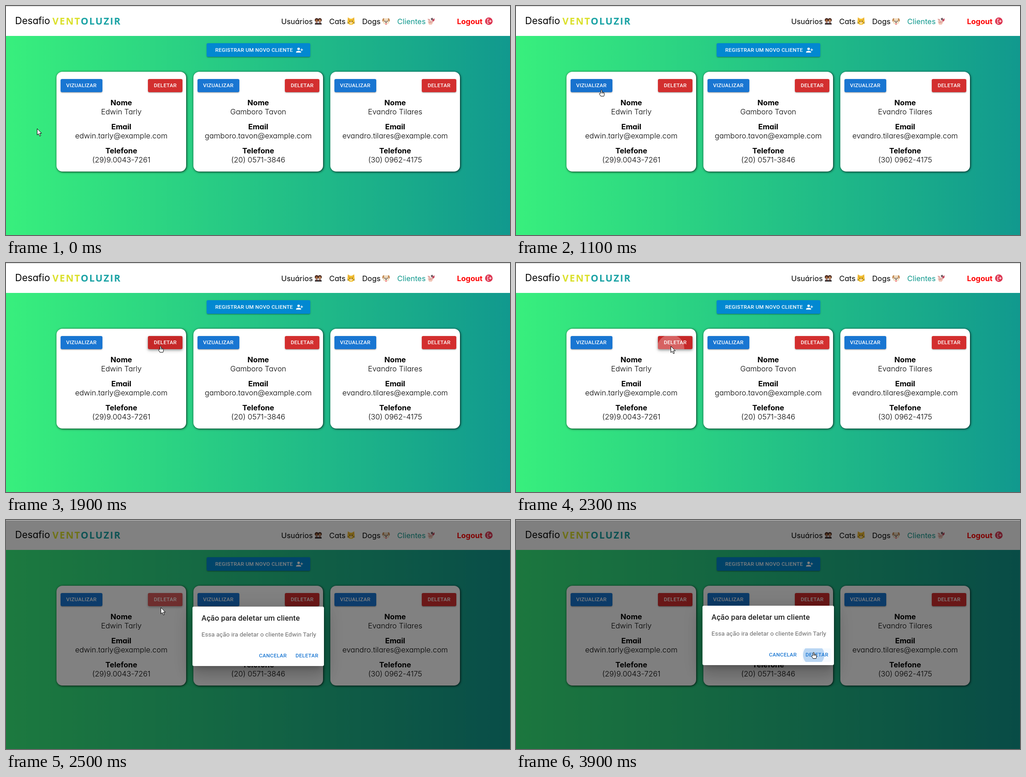
These frames come from a looping animation (1108 px wide and 505 px high, 4000 ms). An HTML page:

```html
<!DOCTYPE html>
<html lang="pt-BR">
<head>
<meta charset="utf-8">
<title>Clientes</title>
<style>
html, body { margin: 0; width: 100%; height: 100%; overflow: hidden; }
#stage { position: relative; width: 1108px; height: 505px; overflow: hidden;
  background: linear-gradient(to left, #11998e, #38ef7d);
  font: 16.4px/20px Inter, "Noto Sans", sans-serif; font-feature-settings: "cv11"; color: #000; }
#stage div { position: absolute; white-space: nowrap; }
#stage svg { position: absolute; overflow: visible; }
.header { background: #fff; }
.edge { background: #c9c9c9; }
.title { font-size: 21px; }
.brand { font: 700 21px/24px "Open Sans", sans-serif; letter-spacing: 2px; color: #1ba3a5; }
.brand span { color: #dbe02c; }
.active { color: #11998e; }
.logout { color: #f00; font-weight: 700; }
.card { background: #fff; border-radius: 13px; box-shadow: 1px 1px 5px rgba(0,0,0,.85); }
.line { text-align: center; font-weight: 300; }
.bold { font-weight: 700; }
.btn { font: 500 11.5px/28px Roboto, sans-serif; letter-spacing: .31px; text-align: center; color: #fff;
  border-radius: 3.3px; overflow: hidden;
  box-shadow: 0 2.5px 1px -1.7px rgba(0,0,0,.2), 0 1.7px 1.7px rgba(0,0,0,.14), 0 1px 4px rgba(0,0,0,.12); }
.info { background: #0288d1; text-align: left; line-height: 30px; }
.view { background: #1976d2; }
.del { background: #d32f2f; }
.text { background: none; color: #1976d2; box-shadow: none; }
.ripple { border-radius: 50%; }
.dim { background: #000; }
.dialog { background: #fff; border-radius: 3.3px; font-family: Roboto, sans-serif;
  box-shadow: 0 9px 12px -6px rgba(0,0,0,.2), 0 20px 32px 2px rgba(0,0,0,.14), 0 8px 38px 7px rgba(0,0,0,.12); }
.heading { font-size: 16.6px; font-weight: 500; letter-spacing: .12px; color: rgba(0,0,0,.87); }
.body { font-size: 13.3px; letter-spacing: .125px; color: rgba(0,0,0,.6); }
</style>
</head>
<body>
<div id="stage"></div>
<script>
const stage = document.getElementById('stage');

function box(parent, cls, x, y, w, h, html = '') {
  const el = document.createElement('div');
  el.className = cls;
  el.style.cssText = `left:${x}px;top:${y}px;width:${w}px;height:${h}px`;
  el.innerHTML = html;
  parent.append(el);
  return el;
}

function icon(parent, x, y, size, view, shapes) {
  parent.insertAdjacentHTML('beforeend',
    `<svg style="left:${x}px;top:${y}px" width="${size}" height="${size}" viewBox="0 0 ${view} ${view}">${shapes}</svg>`);
  return parent.lastElementChild;
}

const dot = (x, y, r, fill) => `<circle cx="${x}" cy="${y}" r="${r}" fill="${fill}"/>`;
const shape = (d, fill, extra = '') => `<path d="${d}" fill="${fill}" ${extra}/>`;
const eyes = dot(6, 8.5, 1.1, '#322') + dot(11, 8.5, 1.1, '#322');
const person = (x, skin) => dot(x, 6, 4.3, '#46271f') + dot(x, 7, 2.6, skin) +
  shape(`M${x - 4} 16q0-5 4-5t4 5z`, '#3b3a3c') + shape(`M${x - 1.2} 11h2.4l-1.2 4z`, '#b3473c');

const icons = {
  people: person(5, '#a5683f') + person(12, '#c98c5c'),
  cat: shape('M1.5 0l5 3h4l5-3 .8 10q-1 6-7.8 6.5Q1.7 16 .7 10z', '#f3c12f') +
    shape('M2.7 2.5l2 2-2 2zM14.3 2.5l-2 2 2 2z', '#d88a58') + eyes +
    dot(8.5, 12, 2.6, '#fbe9b0') + shape('M7.3 10.5h2.4l-1.2 1.5z', '#b55') +
    shape('M0 11l4 .5M0 13.5l4-.8M17 11l-4 .5M17 13.5l-4-.8', 'none', 'stroke="#6b5320" stroke-width=".7"'),
  dog: dot(8.5, 9, 7, '#f0dcc0') + shape('M4.5 2Q0 1 .3 8q1.7 3 3.7-1zM12.5 2q4.500-1 4.2 6-1.7 3-3.7-1z', '#c28a55') +
    eyes + dot(8.5, 12, 3, '#fff6e6') + dot(8.5, 10.8, 1.4, '#3a2b2b') + shape('M7 13h3q0 3.5-1.5 3.5T7 13z', '#ef6d78'),
  client: shape('M1 9l5-2 5 1 2 3-3 5H4z', '#f0c2b4') + shape('M1 3l5 1 1 4-5-1z', '#e2a9a4') +
    shape('M8 2l4-1 1 4-4 2z', '#6c5960') + shape('M11 6l5-4v5l-4 3z', '#c4485c') + shape('M4 11l6-1', 'none', 'stroke="#b2737b"'),
  exit: dot(8.5, 8.5, 8.3, '#dc3450') +
    shape('M9 4H5.5v9H9M8 8.5h5M11 6l2.5 2.5L11 11', 'none', 'stroke="#fbdde0" stroke-width="1.5"')
};

// Header
box(stage, 'header', 0, 0, 1108, 66);
box(stage, 'title', 20, 22.5, 80, 20, 'Desafio');
box(stage, 'brand', 102, 21, 160, 24, '<span>VENT</span>OLUZIR');
[['', 605, 'Usuários', 677.5, 'people'], ['', 710.5, 'Cats', 750, 'cat'], ['', 783, 'Dogs', 827, 'dog'],
 ['active', 860, 'Clientes', 925.5, 'client'], ['logout', 991.5, 'Logout', 1053, 'exit']]
  .forEach(([cls, x, label, ix, name]) => {
    box(stage, cls, x, 24, 70, 20, label);
    icon(stage, ix, 25, 17, 17, icons[name]);
  });

// New client button
const register = box(stage, 'btn info', 441, 82, 227.5, 30.3);
box(register, '', 19, 0, 175, 30, 'REGISTRAR UM NOVO CLIENTE');
icon(register, 195.5, 6.7, 16.6, 24,
  shape('M13 8a4 4 0 1 0-8 0 4 4 0 0 0 8 0zm2 2v2h3v3h2v-3h3v-2h-3V7h-2v3zM1 18v2h16v-2c0-2.66-5.33-4-8-4s-8 1.34-8 4z', '#fff'));

// Cards
const clients = [
  ['Edwin Tarly', 'edwin.tarly@example.com', '(29)9.0043-7261'],
  ['Gamboro Tavon', 'gamboro.tavon@example.com', '(20) 0571-3846'],
  ['Evandro Tilares', 'evandro.tilares@example.com', '(30) 0962-4175']
];
const cards = clients.map((values, i) => {
  const card = box(stage, 'card', 111 + 301 * i, 144.5, 285.3, 220.5);
  const view = box(card, 'btn view', 8.5, 16, 92.5, 29.8, 'VIZUALIZAR');
  const del = box(card, 'btn del', 201.3, 16, 75.5, 29.8, 'DELETAR');
  ['Nome', 'Email', 'Telefone'].forEach((label, j) => {
    box(card, 'line bold', 0, 58.5 + 52.8 * j, 285, 20, label);
    box(card, 'line', 0, 78.8 + 52.8 * j, 285, 20, values[j]);
  });
  return { view, del };
});
const { view, del } = cards[0];
const delRipple = box(del, 'ripple', 0, 0, 0, 0);

// Dialog
const dim = box(stage, 'dim', 0, 0, 1108, 505);
const dialog = box(stage, 'dialog', 410.3, 189, 289.2, 131);
box(dialog, 'heading', 19.5, 16, 250, 20, 'Ação para deletar um cliente');
box(dialog, 'body', 19.5, 52, 260, 20, `Essa ação ira deletar o cliente ${clients[0][0]}`);
box(dialog, 'btn text', 140, 94, 73, 30, 'CANCELAR');
const confirmBtn = box(dialog, 'btn text', 220, 94, 62.5, 30, 'DELETAR');
const confirmRipple = box(confirmBtn, 'ripple', 0, 0, 0, 0);

box(stage, 'edge', 0, 0, 1108, 1);

// Pointers, with the hot spot at 0,0
const ink = 'stroke="#000" stroke-linejoin="round"';
const arrow = icon(stage, 0, 0, 20, 20, shape('M.5.5V14.5L3.7 11.5 6 17l2.3-1L6 10.7h4.300z', '#fff', ink));
const hand = icon(stage, 0, 0, 20, 20,
  shape('M-1.5 7V1.2q1.3-1.7 2.6 0V5q2.4-.7 2.6.8 2-.5 2.3 1V11q0 1.5-1 3H-1.5L-4.8 8.8Q-4.5 6.5-2.5 8z', '#fff', ink) +
  shape('M1.1 5V8M3.5 5.8V8', 'none', ink));

// Pointer path: time, x, y
const path = [
  [100, 68, 270], [200, 72, 269.5], [300, 88, 266], [400, 118, 260], [500, 150, 254], [600, 176, 250],
  [700, 191.5, 247.5], [900, 189, 218], [1100, 188, 185], [1200, 201, 181], [1300, 222, 181],
  [1500, 291.5, 183], [1600, 318, 183], [1700, 332, 183], [1900, 340, 183], [2300, 340, 183],
  [2400, 340, 186], [2500, 340, 192.5], [2600, 352, 210], [2700, 381, 238], [2900, 485, 269],
  [3100, 588, 287], [3200, 625, 288.5], [3300, 643, 281], [3400, 650, 286], [3600, 654.5, 291.5], [4000, 654.5, 291.5]
];

const ramp = (t, start, length) => Math.min(1, Math.max(0, (t - start) / length));
const mix = (a, b, k) => a + (b - a) * k;
const blend = (from, to, k) => `rgb(${from.map((v, i) => mix(v, to[i], k))})`;

function pointerAt(t) {
  if (t <= path[0][0]) return path[0].slice(1);
  const i = path.findIndex(p => p[0] >= t);
  const [a, b] = [path[i - 1], path[i]];
  const k = ramp(t, a[0], b[0] - a[0]);
  return [mix(a[1], b[1], k), mix(a[2], b[2], k)];
}

function setRipple(el, x, y, r, rgb, alpha) {
  el.style.cssText = `left:${x - r}px;top:${y - r}px;width:${2 * r}px;height:${2 * r}px;background:rgba(${rgb},${alpha})`;
}

function draw(t) {
  const [x, y] = pointerAt(t);
  const pointing = (t >= 1100 && t < 1300) || (t >= 1600 && t < 2300) || t >= 3400;
  arrow.style.display = pointing ? 'none' : '';
  hand.style.display = pointing ? '' : 'none';
  arrow.style.transform = hand.style.transform = `translate(${x}px,${y}px)`;

  const viewHover = ramp(t, 1050, 200) - ramp(t, 1250, 250);
  const delHover = ramp(t, 1550, 250) - ramp(t, 2350, 250);
  view.style.background = blend([25, 118, 210], [21, 101, 192], viewHover);
  del.style.background = blend([211, 47, 47], [198, 40, 40], delHover);
  del.style.boxShadow = delHover > 0 ? `0 2px 4px rgba(0,0,0,${.2 + .1 * delHover}), 0 3px 8px rgba(0,0,0,${.2 * delHover})` : '';

  const delAlpha = t < 2200 ? 0 : .27 * mix(.5, 1, ramp(t, 2200, 100)) * (1 - ramp(t, 2450, 250));
  setRipple(delRipple, 28, 27, mix(18, 54, ramp(t, 2200, 300)), '255,255,255', delAlpha);

  dim.style.opacity = t < 2400 ? 0 : mix(.2, .5, ramp(t, 2400, 102));
  dialog.style.display = t < 2400 ? 'none' : '';
  dialog.style.top = (t < 2500 ? 355 : t < 2600 ? 190.5 : 189) + 'px';

  confirmBtn.style.background = `rgba(25,118,210,${.04 * ramp(t, 3300, 250)})`;
  setRipple(confirmRipple, 24, 14.5, mix(11, 23.5, ramp(t, 3800, 100)), '25,118,210', t < 3800 ? 0 : mix(.18, .28, ramp(t, 3800, 100)));
}

const start = performance.now();
function tick() {
  const t = (performance.now() - start) % 4000;
  draw(Math.floor(t / 100) * 100);
  requestAnimationFrame(tick);
}
tick();
</script>
</body>
</html>
```
